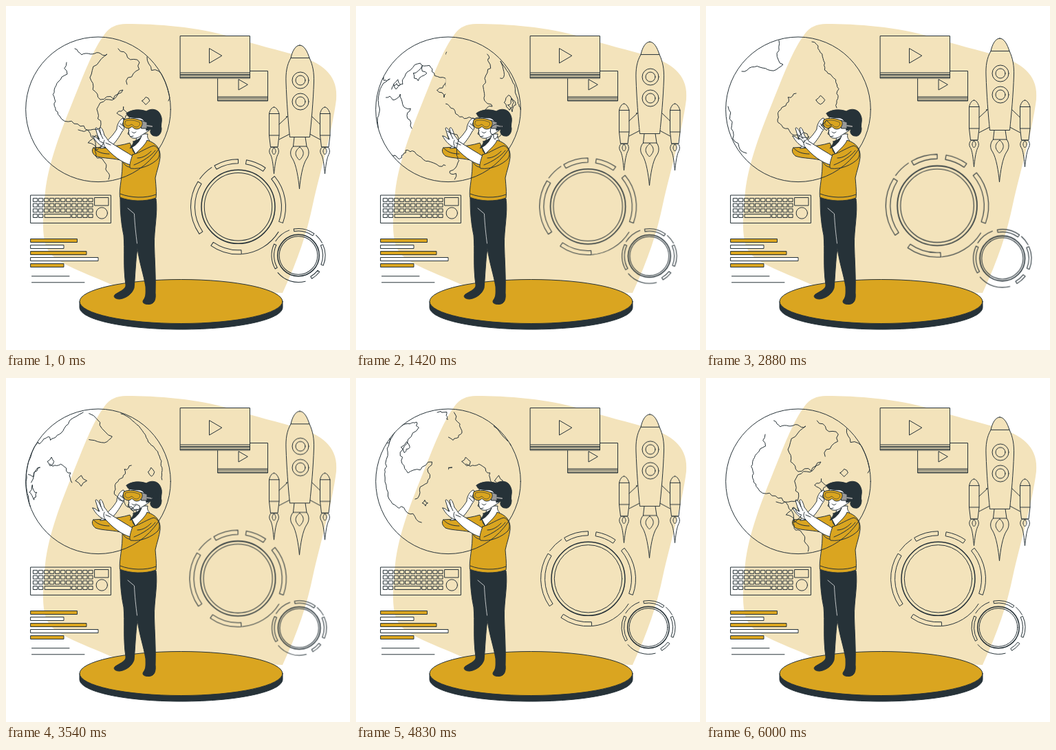
An HTML page that plays this animation: 500x500 px, repeating every 6.04 s.

```html
<!DOCTYPE html>
<html lang="en">
<head>
<meta charset="utf-8">
<title>Virtual reality</title>
<style>
  html, body { margin: 0; width: 100%; height: 100%; overflow: hidden; background: #fff; }
  svg { display: block; width: 100%; height: 100%; }
  .line { fill: none; stroke: #263238; stroke-width: 1; stroke-linejoin: round; stroke-linecap: round; }
  .tint { fill: #f3e3bb; }
  .gold { fill: #daa520; }
  .white { fill: #fff; }
  .dark { fill: #263238; }
  .grey { fill: #999; }
  #rocket { animation: hover 6040ms linear infinite; }
  #rings { transform-origin: 356px 311px; animation: pulse 6040ms cubic-bezier(.37, 0, .63, 1) infinite; }
  @keyframes hover { 50% { transform: translateY(-10.5px); } }
  @keyframes pulse {
    0%, 29.8%, 36.4%, 62.4%, 100% { transform: scale(1); }
    9.93%, 49.8% { transform: scale(1.088); }
  }
</style>
</head>
<body>
<svg viewBox="0 0 500 500">
  <defs>
    <clipPath id="clipOld"><rect id="oldArea" y="0" width="500" height="500"/></clipPath>
    <clipPath id="clipNew"><rect id="newArea" y="0" width="0" height="500"/></clipPath>
    <g id="booster">
      <path d="M389.5 147C386 147 383.5 152 382.5 156.5V188L384.5 205H395L397 188V156.5C395.5 152 393 147 389.5 147ZM382.5 156.5H397M382.5 188H397"/>
      <path d="M385 205.5C382 209 382 213 385 217C387.5 223 388.5 234 389.5 244C390.5 234 392 223 394.5 217C397 213 397 209 394.5 205.5ZM389.5 206C386 209 386 213 389.5 216C393 213 393 209 389.5 206Z"/>
    </g>
  </defs>

  <path class="tint" d="M175 26C160 26 151 31 144 40C126 63 111 105 97 139C80 181 62 227 57 270C54 300 51 335 60 353C70 374 116 388 163 409L402 417C424 370 438 328 446 288C457 239 474 183 480 136C483 104 464 85 429 74C397 64 361 56 327 45C279 30 218 26 175 26Z"/>

  <g class="line">
    <rect class="tint" x="308" y="94.500" width="72.5" height="43.5"/>
    <path d="M308 132H380.5M308 134H380.5M308 136.8H380.5M338 107V122L351 114.5Z"/>
    <rect class="tint" x="253.5" y="43.5" width="101" height="61.5"/>
    <path d="M253.5 97H354.5M253.5 99.500H354.5M253.5 101H354.5M253.5 103.5H354.5M295.5 62V83L313.5 72.5Z"/>
  </g>

  <g class="line" id="keyboard">
    <rect x="36" y="275" width="116.5" height="40.5"/>
    <rect x="129" y="278.5" width="20" height="11.5"/>
    <circle cx="139.3" cy="301" r="8.2"/>
    <rect x="56.5" y="302.5" width="37.5" height="5"/>
  </g>

  <g class="line" id="bars"><path d="M37.5 392.7H92M37.5 401.8H114"/></g>

  <g class="line" id="rings"></g>

  <g class="line" id="rocket">
    <path d="M397 172L411 159M397 194L412.5 186M456.5 172L443 159M456.5 194L441.5 186"/>
    <use href="#booster"/>
    <use href="#booster" x="74"/>
    <path class="tint" d="M427 57C420.5 57 416 66 414 75.5C408 86 406.5 97 407 111C408 139 410 167 412.5 190.5H441.5C444 167 446.5 139 447.5 111C448 97 446 86 441 75.5C438 66 433.5 57 427 57ZM414 75.5H441"/>
    <circle cx="428" cy="108" r="12"/><circle cx="428" cy="108" r="7"/>
    <circle cx="428" cy="139" r="12"/><circle cx="428" cy="139" r="7"/>
    <path d="M419 190.5L417.5 204M435 190.5L437 204M417.5 204H437C441 209 441 217 437 222C431 231 428 250 426.5 266C425 250 422 231 416.5 222C412.5 217 412.5 209 417.5 204ZM427 205C420.5 210 418 216 426.5 224C435 216 433 210 427 205Z"/>
    <circle class="dark" cx="407.8" cy="161" r=".4"/>
  </g>

  <g class="line">
    <path class="dark" d="M107 429.5V438C107 456 173 470 254.5 470S402 456 402 438V429.5Z"/>
    <ellipse class="gold" cx="254.5" cy="429.5" rx="147.5" ry="32"/>
  </g>

  <g class="line">
    <path class="dark" d="M166 279L218 280C221 300 215 325 215.5 347C216 370 218 394 217 417C218 426 216 433 208 433.5C201 434 197 431 200 427C204 422 203 415 203 408C200 390 194 374 191 352C188 374 188 391 186 410C183 419 174 425 165 426C158 426 155 422 159 419C167 414 175 411 174 405C170 379 173 354 171 333C167 315 166 297 166 279Z"/>
    <path style="stroke:#fff;stroke-width:.7" d="M177 294L186.5 302C187 316 189 333 190.5 345"/>
    <path class="white" d="M190 186H206C204 194 210 194 209 199L188 215L180 206C188 202 190 196 190 186Z"/>
    <path class="gold" d="M127 206C140 205 160 205 180 199L188 215C196 207 203 201 205 195C218 199 225 207 224 220C223 230 219 240 217 250C218 261 219 272 218 279C202 285 180 284 165.5 278C164 264 170 247 169 225C160 221 140 222 130 218C125 214 124 209 127 206Z"/>
    <path d="M166 273C181 279 203 280 218 274M169 225C172 233 180 236 186 234M184 210L190 218M181 203L187 214"/>
    <path class="white" d="M144 198C150 194 157 186 161 179C161 173 165 165 170 163C173 163 172 166 169 172C172 174 173 179 169 182C165 190 158 200 151 206L137 207Z"/>
    <path d="M166 171L172 176M164 174L170 180M128 207C133 213 142 215 150 215"/>
    <path class="white" d="M126 189C128 188 133 193 135 194L130 178C131 175 134 178 138 187L136 178C138 174 141 180 143 188C146 191 147 194 150 197C162 205 176 213 187 220L181 231C167 227 155 217 145 206C137 204 130 197 126 189Z"/>
    <path d="M138 187L141 193M133 188L136 194M143 195C141 199 142 203 145 206M145 199L152 202"/>
    <path class="gold" d="M184 216C196 213 206 205 215 203C223 206 225 215 221 222C212 231 196 238 181 236C178 233 182 222 184 216Z"/>
    <path d="M186 231C199 226 212 217 217 210M191 221C200 221 207 215 211 211"/>
    <path class="white" d="M179 162C179 173 177 184 180 189C184 194 191 193 197 188L208 181L207 159Z"/>
    <path class="dark" d="M185 197C190 195 195 193 197 189C192 202 185 204 180 207C183 203 186 199 185 197Z"/>
    <path d="M179 181L177 186L179 187M183 183C185 185 187 185 189 183M181 190L185 189"/>
    <path class="dark" d="M175 156C181 151 193 149 204 153C211 148 221 150 224 157C229 166 224 171 226 178C226 185 222 190 217 189C211 189 208 183 211 179L204 181C203 174 204 167 196 163C187 162 177 163 176 158Z"/>
    <path class="grey" d="M196 166L205 169V178L197 178Z"/>
    <path style="stroke:#999;stroke-width:2" d="M205 174L212 175"/>
    <path class="gold" d="M172 165C178 162 190 163 197 167C200 171 197 179 190 179C185 179 184 174 182 176C178 180 172 177 171 173C170 169 170 166 172 165Z"/>
    <path style="stroke-width:.6" d="M174 167C180 165 188 166 194 169C196 172 193 176 189 176C185 176 185 172 182 172C178 176 174 174 173 171Z"/>
  </g>

  <g class="line">
    <circle cx="134" cy="150.3" r="105.3"/>
    <g clip-path="url(#clipOld)"><path id="oldLand"/></g>
    <g clip-path="url(#clipNew)"><path id="newLand"/></g>
  </g>
</svg>
<script>
const LOOP = 6040, CX = 134, CY = 150.3, R = 105.3;
const SPIN = Math.PI / 4000; // radians per ms
const $ = id => document.getElementById(id);

function add(parent, tag, attrs) {
  const el = document.createElementNS('http://www.w3.org/2000/svg', tag);
  for (const name in attrs) el.setAttribute(name, attrs[name]);
  parent.append(el);
}

// Keyboard: four rows of eleven keys, with the space bar in the last row
for (let row = 0; row < 4; row++) {
  for (let col = 0; col < 11; col++) {
    if (row === 3 && col > 1 && col < 7) continue;
    add($('keyboard'), 'rect', { x: 39.8 + col * 8.05, y: 279.4 + row * 7.7, width: 5.8, height: 5 });
  }
}

[67.5, 48, 81, 98, 48].forEach((width, i) =>
  add($('bars'), 'rect', { x: 36, y: 338.5 + i * 9, width, height: 5, class: i % 2 ? 'white' : 'gold' }));

// Rings: bands span two radii, arcs follow the outer one
function ring(cx, cy, outer, inner, bands, arcs) {
  const at = (r, deg) => {
    const a = deg * Math.PI / 180;
    return `${cx + r * Math.cos(a)} ${cy + r * Math.sin(a)}`;
  };
  const core = outer * .775;
  add($('rings'), 'circle', { cx, cy, r: core, style: 'stroke-width:1.5' });
  add($('rings'), 'circle', { cx, cy, r: core * .92 });
  for (const [a, b] of bands) {
    add($('rings'), 'path', { d: `M${at(outer, a)}A${outer} ${outer} 0 0 1 ${at(outer, b)}L${at(inner, b)}A${inner} ${inner} 0 0 0 ${at(inner, a)}Z` });
  }
  for (const [a, b] of arcs) {
    add($('rings'), 'path', { d: `M${at(outer, a)}A${outer} ${outer} 0 0 1 ${at(outer, b)}` });
  }
}
ring(337.5, 291.8, 69, 63, [[145, 212], [240, 270], [280, 305], [-40, 20], [86, 125]], [[216, 236], [32, 85]]);
ring(425, 362.5, 39, 35.5, [[150, 205], [260, 306], [-24, 22], [38, 60]], [[212, 250], [311, 332], [75, 140]]);

// Rough coastlines at set moments of the turn: time, then lines of x, y pairs
const views = [
  [0, [88, 82, 76, 110, 78, 160, 130, 208, 149, 252],
    [100, 62, 147, 70, 122, 104, 137, 136, 170, 122, 138, 172, 105, 180],
    [163, 62, 194, 82, 176, 114], [205, 74, 236, 138]],
  [830, [103, 67, 73, 140, 120, 163, 154, 146, 168, 70],
    [88, 182, 131, 252], [176, 105, 193, 80, 228, 150]],
  [2040, [47, 107, 80, 106, 45, 177], [78, 133, 108, 128, 128, 178],
    [89, 121, 118, 93, 212, 140], [62, 223, 167, 232]],
  [2880, [52, 95, 112, 85, 106, 50], [154, 52, 190, 148],
    [131, 127, 104, 165, 150, 190], [32, 146, 59, 214]],
  [4330, [45, 190, 62, 98, 130, 50], [66, 140, 100, 130, 78, 152],
    [120, 125, 160, 152], [188, 48, 234, 121]],
  [5330, [42, 102, 72, 70, 116, 72, 95, 108, 113, 138, 150, 122, 124, 176],
    [57, 88, 74, 172, 128, 210], [130, 50, 215, 98]]
].map(([time, ...coasts]) => ({ time, lines: [...coasts.map(coast), ...islands()].map(unproject) }));

function random() {
  random.seed = ((random.seed ?? 7) * 16807) % 2147483647;
  return random.seed / 2147483647;
}

// Splits a segment at a shifted midpoint until its parts are short
function roughen(a, b) {
  const dx = b[0] - a[0], dy = b[1] - a[1];
  if (Math.hypot(dx, dy) < 6) return [b];
  const k = (random() - .5) * .5;
  const mid = [(a[0] + b[0]) / 2 - dy * k, (a[1] + b[1]) / 2 + dx * k];
  return [...roughen(a, mid), ...roughen(mid, b)];
}

function coast(flat) {
  const line = [[flat[0], flat[1]]];
  for (let i = 2; i < flat.length; i += 2) line.push(...roughen(line.at(-1), [flat[i], flat[i + 1]]));
  return line;
}

function islands() {
  return Array.from({ length: 3 }, () => {
    const turn = random() * 7, dist = R * (.3 + random() * .4), size = 4 + random() * 8;
    const x = CX + dist * Math.cos(turn), y = CY + dist * Math.sin(turn);
    return coast([x - size, y, x, y - size, x + size, y, x, y + size, x - size, y]);
  });
}

function unproject(line) {
  return line.map(([x, y]) => {
    const r = Math.sqrt(Math.max(R * R - (y - CY) ** 2, 1));
    return { y, r, lon: Math.asin(Math.max(-1, Math.min(1, (x - CX) / r))) };
  });
}

function land(view, elapsed) {
  let d = '';
  for (const line of view.lines) {
    let pen = 'M';
    for (const p of line) {
      const lon = p.lon + elapsed * SPIN;
      if (Math.abs(lon) > Math.PI / 2 + 1e-6) { pen = 'M'; continue; }
      d += `${pen}${(CX + p.r * Math.sin(lon)).toFixed(1)} ${p.y.toFixed(1)}`;
      pen = 'L';
    }
  }
  return d;
}

// The next side of the globe comes in from the left while it turns
function draw(t) {
  const i = views.findLastIndex(v => v.time <= t);
  const now = views[i], next = views[(i + 1) % views.length];
  const end = next.time || LOOP;
  const p = (t - now.time) / (end - now.time);
  const edge = CX - R - 1 + (2 * R + 2) * Math.max(0, Math.min(1, (p - .15) / .7));
  $('oldArea').setAttribute('x', edge);
  $('newArea').setAttribute('width', edge);
  $('oldLand').setAttribute('d', land(now, t - now.time));
  $('newLand').setAttribute('d', land(next, t - end));
}

let start;
function tick(time) {
  start ??= time;
  draw((time - start) % LOOP);
  requestAnimationFrame(tick);
}
draw(0);
requestAnimationFrame(tick);
</script>
</body>
</html>
```
